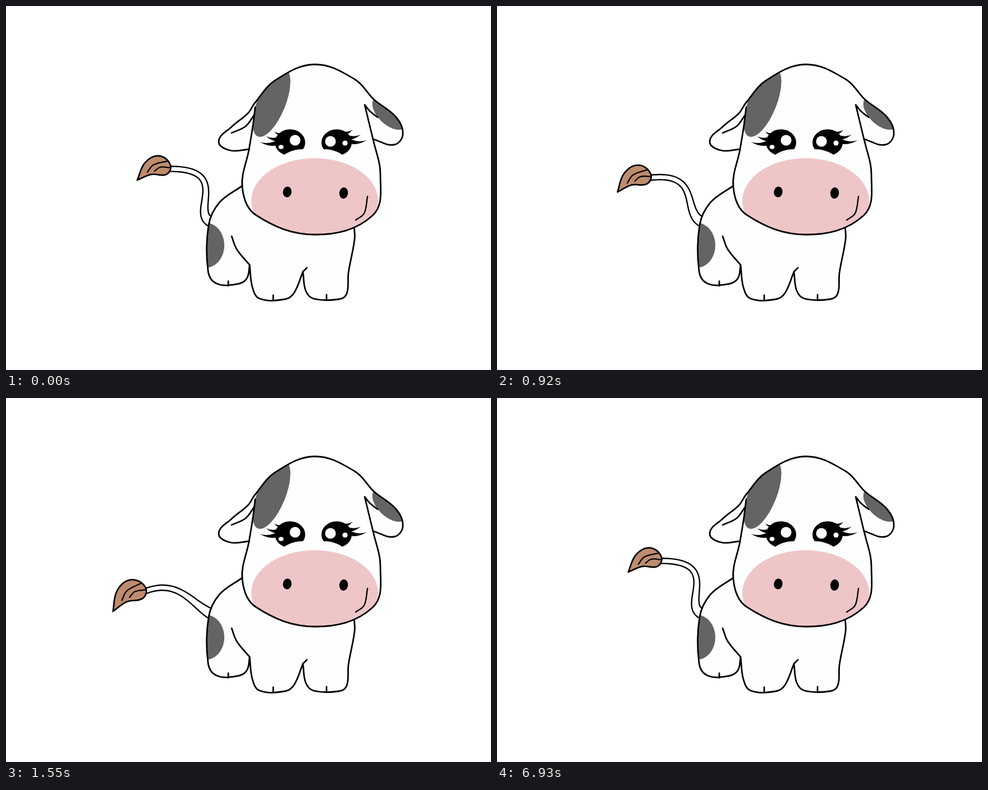
An HTML page with a canvas for the animation above (8000 ms loop, 864 by 648 pixels).

```html
<!DOCTYPE html>
<html lang="en">
<head>
<meta charset="utf-8">
<title>Little cow</title>
<style>
html, body { margin: 0; width: 100%; height: 100%; overflow: hidden; background: #fff; }
canvas { display: block; }
</style>
</head>
<body>
<canvas id="stage" width="864" height="648"></canvas>
<script>
const ctx = document.getElementById('stage').getContext('2d');
const INK = '#000', SKIN = '#fdfffe', SPOT = '#646464', PINK = '#eec6c8', HAIR = '#bd8c6e';
const LOOP = 8000, STEP = 70, SWING_START = 500, SWING_STEPS = 20;
const BLINK_START = 6830, BLINK_END = 6930;
const RAD = Math.PI / 180;

// Appends a smooth curve through key points; handles scale with chord length.
function curve(path, pts, join) {
  const last = pts.length - 1;
  const dir = i => {
    const [ax, ay] = pts[Math.max(0, i - 1)], [bx, by] = pts[Math.min(last, i + 1)];
    const len = Math.hypot(bx - ax, by - ay) || 1;
    return [(bx - ax) / len, (by - ay) / len];
  };
  path[join ? 'lineTo' : 'moveTo'](...pts[0]);
  for (let i = 0; i < last; i++) {
    const [ax, ay] = pts[i], [bx, by] = pts[i + 1];
    const [ux, uy] = dir(i), [vx, vy] = dir(i + 1);
    const h = Math.hypot(bx - ax, by - ay) * 0.36;
    path.bezierCurveTo(ax + ux * h, ay + uy * h, bx - vx * h, by - vy * h, bx, by);
  }
}

// Smooth runs that meet in corners.
function shape(...runs) {
  const path = new Path2D();
  runs.forEach((run, i) => curve(path, run, i > 0));
  return path;
}

// Separate smooth strokes.
function strokes(...runs) {
  const path = new Path2D();
  runs.forEach(run => curve(path, run));
  return path;
}

function fill(path, color) {
  ctx.fillStyle = color;
  ctx.fill(path);
}

function line(path, width = 2.8) {
  ctx.strokeStyle = INK;
  ctx.lineWidth = width;
  ctx.stroke(path);
}

function oval(x, y, rx, ry, color, tilt = 0) {
  ctx.beginPath();
  ctx.ellipse(x, y, rx, ry, tilt * RAD, 0, Math.PI * 2);
  ctx.fillStyle = color;
  ctx.fill();
}

function inside(path, draw) {
  ctx.save();
  ctx.clip(path);
  draw();
  ctx.restore();
}

// --- Tail: swings about its root, through these angles and back ---
const SWAY = [62, 52, 40, 18, -1, -9];
const REST = SWAY[1];
const ROOT = [363, 383];

const tuft = shape([[-58, 20], [-44, -11], [-19, -23], [1, -7], [-6, 10], [-33, 10], [-58, 20]]);
const tuftLines = strokes([[-40, 6], [-29, -7], [-3, -14]], [[-27, 4], [-17, -3], [0, -2]]);

function tailAngle(t) {
  const step = Math.floor((t - SWING_START) / STEP);
  if (step < 0 || step >= SWING_STEPS) return REST;
  return SWAY[5 - Math.abs(5 - (step + 2) % 10)];
}

function drawTail(angle) {
  const reach = 123 - 0.14 * angle;
  const end = [ROOT[0] - reach * Math.cos(angle * RAD), ROOT[1] - 2 - reach * Math.sin(angle * RAD)];
  const bend = [end[0] + 31 + 1.5 * angle, end[1] - 25 + 0.0093 * angle * angle];
  const knots = [ROOT, [330, 365], bend, end];

  const upper = [], lower = [];
  for (let i = 0; i <= 16; i++) {
    const t = i / 16, s = 1 - t;
    const pos = k => s * s * s * knots[0][k] + 3 * s * s * t * knots[1][k] +
      3 * s * t * t * knots[2][k] + t * t * t * knots[3][k];
    const vel = k => s * s * (knots[1][k] - knots[0][k]) +
      2 * s * t * (knots[2][k] - knots[1][k]) + t * t * (knots[3][k] - knots[2][k]);
    const half = (4.6 + 4.4 * s ** 3) / Math.hypot(vel(0), vel(1));
    upper.push([pos(0) - vel(1) * half, pos(1) + vel(0) * half]);
    lower.unshift([pos(0) + vel(1) * half, pos(1) - vel(0) * half]);
  }
  const tail = shape(upper, lower);
  fill(tail, SKIN);
  line(tail, 2.4);

  const drop = REST - angle, size = 1 + 0.0033 * drop;
  ctx.save();
  ctx.translate(...end);
  ctx.rotate(-0.38 * drop * RAD);
  ctx.scale(size, size);
  fill(tuft, HAIR);
  line(tuft, 2.7 / size);
  line(tuftLines, 2.3 / size);
  ctx.restore();
}

// --- Body ---
const body = shape(
  [[421, 320], [380, 350], [361, 390], [360, 472], [375, 494], [412, 495], [429, 485], [434, 461]],
  [[434, 461], [439, 501], [452, 521], [497, 522], [513, 511], [529, 473]],
  [[529, 473], [534, 507], [548, 521], [593, 522], [607, 512], [610, 475], [621, 415], [620, 390]]
);
const bodyLines = strokes([[402, 410], [411, 433], [434, 461]], [[529, 473], [536, 466]]);
for (const [x, y] of [[396, 490], [476, 515], [571, 514]]) curve(bodyLines, [[x, y], [x, y + 8]]);

// --- Head ---
const head = shape(
  [[433, 255], [399, 257], [379, 241], [402, 215], [431, 191], [443, 173], [480, 132], [550, 104],
    [622, 131], [655, 166], [695, 198], [707, 228], [691, 247], [654, 237]],
  [[654, 237], [667, 301], [653, 373], [550, 407], [445, 372], [421, 323], [433, 255]]
);
const headLines = strokes(
  [[444, 180], [440, 212], [433, 255]],
  [[442, 194], [427, 214], [402, 226]],
  [[654, 238], [639, 176]],
  [[639, 176], [648, 187], [662, 198]]
);
const smile = strokes([[644, 339], [638, 369], [623, 381]]);

// --- Eyes, drawn for the left side about the middle of the face ---
const lid = strokes([[-20, 242], [-46, 235], [-65, 246]]);

// Tapered hair from root over a bend to the tip.
function lash([x, y], [bx, by], [tx, ty], half) {
  const len = Math.hypot(tx - x, ty - y);
  const nx = (y - ty) / len * half, ny = (tx - x) / len * half;
  ctx.beginPath();
  ctx.moveTo(x + nx, y + ny);
  ctx.quadraticCurveTo(bx + nx / 2, by + ny / 2, tx, ty);
  ctx.quadraticCurveTo(bx - nx / 2, by - ny / 2, x - nx, y - ny);
  ctx.fillStyle = INK;
  ctx.fill();
}

function openEye(lift) {
  oval(-41.5, 243, 27, 23.5, INK);
  oval(-20, 311, 56, 56, SKIN);
  ctx.translate(0, -lift);
  lash([-61, 242], [-78, 250], [-95, 242], 5);
  lash([-59, 236], [-72, 240], [-84, 232], 4.5);
  lash([-52, 229], [-62, 231], [-70, 223], 4);
}

function closedEye(lift) {
  line(lid, 3);
  ctx.translate(0, -lift);
  lash([-62, 243], [-70, 260], [-86, 251], 3.4);
  lash([-58, 242], [-71, 245], [-76, 233], 3);
  lash([-51, 238], [-61, 239], [-63, 229], 3);
}

function drawEyes(blink) {
  for (const side of [1, -1]) {
    ctx.save();
    ctx.translate(547.5, 0);
    ctx.scale(side, 1);
    (blink ? closedEye : openEye)(side < 0 ? 3 : 0);
    ctx.restore();
  }
  if (blink) return;
  oval(515, 239, 9.6, 9.6, SKIN);
  oval(490, 251, 4.4, 3.8, SKIN);
  oval(578, 241, 9.6, 9.6, SKIN);
  oval(604, 244, 4.6, 4.6, SKIN);
}

function drawCow(blink) {
  fill(body, SKIN);
  inside(body, () => oval(356, 426, 33, 40, SPOT));
  line(body);
  line(bodyLines);

  fill(head, SKIN);
  inside(head, () => {
    oval(473, 172, 65, 25, SPOT, -68);
    oval(684, 190, 38, 21.5, SPOT, 43);
    drawEyes(blink);
    oval(550, 347, 113, 76, PINK);
  });
  line(head);
  line(headLines);

  oval(501, 331, 7.7, 9.5, INK, 8);
  oval(601.5, 333, 7.7, 10, INK, 6);
  line(smile, 2.4);
}

function render(t) {
  ctx.fillStyle = '#fff';
  ctx.fillRect(0, 0, 864, 648);
  ctx.lineCap = ctx.lineJoin = 'round';
  drawTail(tailAngle(t));
  drawCow(t >= BLINK_START && t < BLINK_END);
}

const start = performance.now();
function tick() {
  render((performance.now() - start) % LOOP);
  requestAnimationFrame(tick);
}
tick();
</script>
</body>
</html>
```
